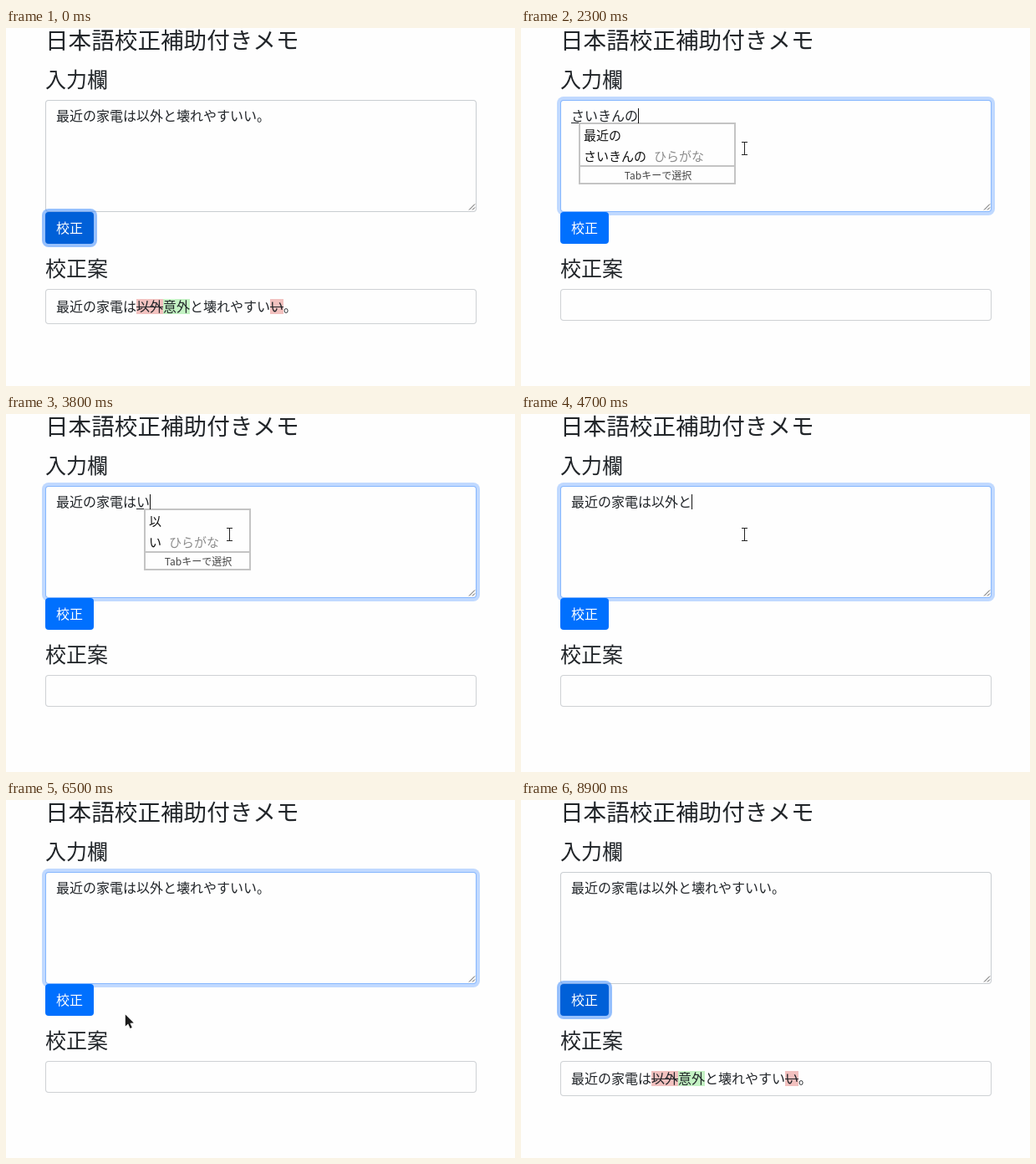
Write an HTML page with a canvas that moves like this. It is 609 px wide and 428 px high and loops after 9.1 s.

```html
<!DOCTYPE html>
<html lang="ja">
<head>
<meta charset="utf-8">
<title>日本語校正補助付きメモ</title>
<style>
  html, body { margin: 0; width: 100%; height: 100%; overflow: hidden; background: #fefefe; }
  canvas { display: block; width: 609px; height: 428px; }
</style>
</head>
<body>
<canvas id="stage" width="609" height="428"></canvas>
<script>
const ctx = document.getElementById('stage').getContext('2d');
const LOOP = 9100;
const FONT = '"Noto Sans CJK JP", "Noto Sans CJK", "Noto Sans", sans-serif';
const INK = '#212529', PAPER = '#fefefe';
const RESET = 100, FOCUS = 1000, HOVER = 6960, CLICK = 7050, RESULT = 7300;

// Each burst is typed key by key, converted, then committed.
const bursts = [
  { at: 1600, gap: 100, keys: 'ｓ さ さい さいｋ さいき さいきｎ さいきん さいきんの', conv: 2450, done: 2600, out: '最近の' },
  { at: 2800, gap: 100, keys: 'ｋ か かｄ かで かでｎ かでん かでんは', conv: 3550, done: 3700, out: '家電は' },
  { at: 3800, gap: 100, keys: 'い いｇ いが いがい いがいｔ いがいと', conv: 4450, done: 4600, out: '以外と' },
  { at: 4800, gap: 85, keys: 'ｋ こ こｗ こわ こわｒ こわれ こわれｙ こわれや こわれやｓ こわれやす こわれやすい こわれやすいい こわれやすいい。', conv: 5900, done: 6000, out: '壊れやすいい。' }
].map(b => ({ ...b, keys: b.keys.split(' ') }));

const kanji = {
  さ: '差', さい: '最', さいき: '再起', さいきん: '最近', さいきんの: '最近の',
  か: '化', かで: '家で', かでん: '家電', かでんは: '家電は',
  い: '以', いが: '以下', いがい: '以外', いがいと: '以外と',
  こ: '子', こわ: '怖', こわれ: '壊れ', こわれや: '壊れや', こわれやす: '壊れやす',
  こわれやすい: '壊れやすい', こわれやすいい: '壊れやすいい', 'こわれやすいい。': '壊れやすいい。'
};

// time, x, y of the pointer
const path = [[650, 267, 144], [6400, 267, 144], [6500, 142, 256], [6680, 118, 332],
              [6780, 112, 348], [7000, 68, 242], [7700, 68, 242]];

const clamp = v => Math.max(0, Math.min(1, v));
const ease = v => { v = clamp(v); return v * v * (3 - 2 * v); };

function text(s, x, y, size = 16, color = INK, weight = 400, align = 'left') {
  ctx.font = `${weight} ${size}px ${FONT}`;
  ctx.textAlign = align;
  ctx.fillStyle = color;
  ctx.fillText(s, x, y);
}

function rect(x, y, w, h, color) {
  ctx.fillStyle = color;
  ctx.fillRect(x, y, w, h);
}

function round(x, y, w, h, r, color) {
  ctx.beginPath();
  ctx.roundRect(x, y, w, h, r);
  ctx.fillStyle = color;
  ctx.fill();
}

function field(x, y, w, h, border) {
  round(x, y, w, h, 4, border);
  round(x + 1, y + 1, w - 2, h - 2, 3, PAPER);
}

function ring(x, y, w, h, rgb, alpha, amount) {
  if (amount <= 0) return;
  const s = 4 * amount;
  round(x - s, y - s, w + 2 * s, h + 2 * s, 4 + s, `rgba(${rgb},${alpha * amount})`);
}

function line(points, color, width) {
  ctx.beginPath();
  points.forEach(([x, y], i) => i ? ctx.lineTo(x, y) : ctx.moveTo(x, y));
  ctx.strokeStyle = color;
  ctx.lineWidth = width;
  ctx.stroke();
}

function typing(t) {
  let fixed = '', comp = '', last = FOCUS, converted = false;
  if (t < RESET || t >= CLICK) return { fixed: bursts.map(b => b.out).join(''), comp, last };
  for (const b of bursts) {
    if (t < b.at) break;
    if (t >= b.done) { fixed += b.out; last = b.done; continue; }
    converted = t >= b.conv;
    const i = Math.min(b.keys.length - 1, Math.floor((t - b.at) / b.gap));
    comp = converted ? b.out : b.keys[i];
    last = converted ? b.conv : b.at + i * b.gap;
  }
  return { fixed, comp, last, converted };
}

function candidates(start, comp) {
  const kana = comp.replace(/[ａ-ｚ]/g, '');
  if (!kana) return;
  const x = start + 9, y = 113, w = 128 + 15 * (kana.length - 1);
  rect(x, y, w, 74, '#c4c4c4');
  rect(x + 2, y + 2, w - 4, 49, PAPER);
  rect(x + 2, y + 53, w - 4, 19, PAPER);
  text(kanji[kana] || kana, x + 6, 134, 15, '#111');
  text(kana, x + 6, 159, 15, '#111');
  text('ひらがな', x + 15 + 15 * kana.length, 159, 15, '#8c8c8c');
  text('Tabキーで選択', x + w / 2 + 1, 181, 12, '#444', 400, 'center');
}

function input(t, focus) {
  ring(47, 86, 516, 134, '13,110,253', 0.26, focus);
  field(47, 86, 516, 134, focus > 0.5 ? '#86b7fe' : '#c9cdd1');
  line([[554, 217.5], [561, 210.5]], '#555', 1);
  line([[558, 217.5], [561, 214.5]], '#555', 1);

  const { fixed, comp, last, converted } = typing(t);
  const start = 60 + fixed.length * 16, end = start + comp.length * 16;
  text(fixed + comp, 60, 111);
  if (comp) {
    rect(start, 113, end - start, 1, INK);
    if (!converted) candidates(start, comp);
  }
  if (t >= FOCUS && t < CLICK && (t - last) % 1000 < 500) rect(end, 96, 1, 18, '#111');
}

function button(t) {
  const pressed = t < RESET || t >= CLICK;
  const glow = t < RESET ? 1 : ease((t - CLICK) / 150);
  ring(47, 220, 58, 38, '49,132,253', 0.5, glow);
  round(47, 220, 58, 38, 4, pressed || t >= HOVER ? '#0060d8' : '#0070fe');
  text('校正', 60, 245, 16, '#fff');
}

function result(shown) {
  field(47, 312, 516, shown ? 42 : 38, '#ced1d4');
  if (!shown) return;
  rect(156, 324, 32, 18, '#f2c1bf');
  rect(188, 324, 32, 18, '#c3f2c3');
  rect(316, 324, 16, 18, '#f2c1bf');
  text('最近の家電は以外意外と壊れやすいい。', 60, 339);
  rect(156, 333, 32, 1, INK);
  rect(316, 333, 16, 1, INK);
}

function outline(points, fill, edge) {
  line(points, edge, 2);
  ctx.closePath();
  ctx.stroke();
  ctx.fillStyle = fill;
  ctx.fill();
}

function beam(x, y) {
  for (const [color, g] of [['#fff', 1], ['#222', 0]]) {
    rect(x - 3 - g, y - 8 - g, 7 + 2 * g, 1 + 2 * g, color);
    rect(x - 3 - g, y + 7 - g, 7 + 2 * g, 1 + 2 * g, color);
    rect(x - g, y - 8, 1 + 2 * g, 16, color);
  }
}

function arrow(x, y) {
  outline([[0, 0], [0, 14], [3.3, 11], [5.8, 16.5], [8, 15.5], [5.6, 10.2], [10, 10]]
    .map(([a, b]) => [x + 0.8 + a, y + 0.5 + b]), '#1b1b1b', '#fff');
}

function hand(x, y) {
  outline([[-1, 0], [1, 0], [2, 1], [2, 6], [5, 6], [8, 7.5], [9, 9], [8.5, 13], [7, 16.5],
           [-1, 16.5], [-5, 11], [-5.5, 9], [-4, 8.5], [-1.5, 10.5], [-2, 1]]
    .map(([a, b]) => [x + a, y + b]), '#fff', '#222');
  for (const a of [1, 3.5, 6]) line([[x + a, y + 10.5], [x + a, y + 14]], '#333', 0.8);
}

function pointer(t) {
  const i = path.findIndex(p => t < p[0]);
  if (i < 1) return;
  const [t0, x0, y0] = path[i - 1], [t1, x1, y1] = path[i];
  const k = (t - t0) / (t1 - t0);
  const x = Math.round(x0 + (x1 - x0) * k), y = Math.round(y0 + (y1 - y0) * k);
  if (x > 47 && x < 563 && y > 86 && y < 220) beam(x, y);
  else if (x > 47 && x < 105 && y >= 220 && y < 258) hand(x, y);
  else arrow(x, y);
}

function draw(t) {
  rect(0, 0, 609, 428, PAPER);
  text('日本語校正補助付きメモ', 47, 25, 27.6, INK, 500);
  text('入力欄', 47, 71, 25, INK, 500);
  text('校正案', 47, 297, 25, INK, 500);
  input(t, ease((t - FOCUS) / 150) * (1 - ease((t - CLICK) / 150)));
  button(t);
  result(t < RESET || t >= RESULT);
  pointer(t);
}

const begin = performance.now();
function tick(now) {
  draw(Math.max(0, now - begin) % LOOP);
  requestAnimationFrame(tick);
}
draw(0);
requestAnimationFrame(tick);
</script>
</body>
</html>
```
